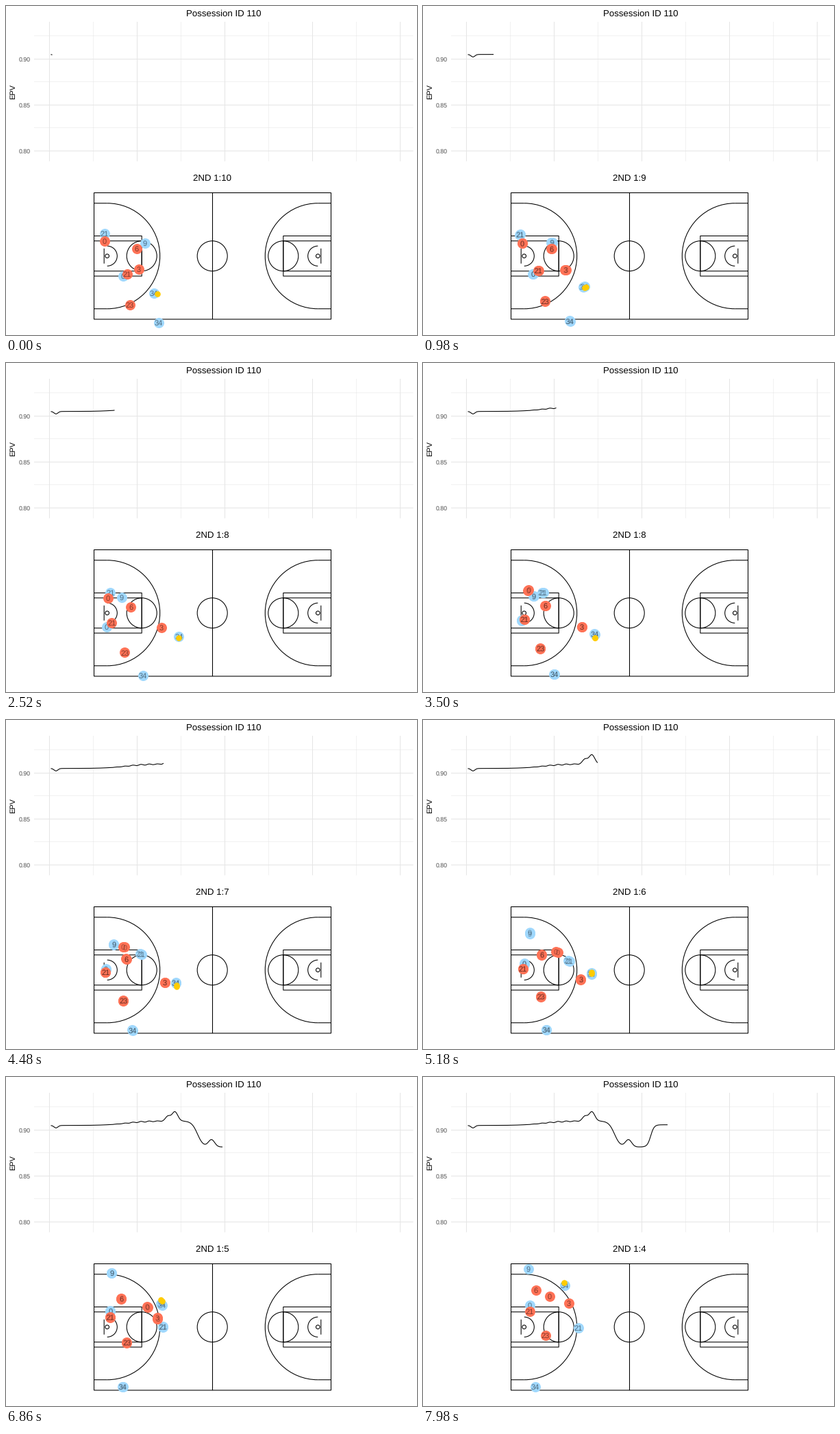
A matplotlib script that plays this animation: 600x480 px, repeating every 8000 ms.

```python
import matplotlib.pyplot as plt
import numpy as np
from matplotlib.animation import FuncAnimation
from matplotlib.collections import LineCollection
from matplotlib.patches import Arc, Circle, Rectangle

W, H = 600, 480
LOOP, TICK, STEP = 8000, 20, 140
LAST = LOOP // STEP
PX = 0.72  # points per pixel at 100 dpi

plt.rcParams.update({"font.family": "Liberation Sans", "path.snap": False,
                     "text.hinting": "none"})
fig = plt.figure(figsize=(W / 100, H / 100), dpi=100, facecolor="white")
ax = fig.add_axes([0, 0, 1, 1], xlim=(0, W), ylim=(H, 0))
ax.axis("off")


def label(x, y, text, size, **kw):
    kw = {"ha": "center", "va": "baseline", **kw}
    return ax.text(x, y, text, fontsize=size * PX, **kw)


def lines(segments, color="black", width=1.07, z=1):
    ax.add_collection(LineCollection(segments, colors=color,
                                     linewidths=width * PX, zorder=z))


# ---- chart ----
LEFT, RIGHT, TOP, BOTTOM = 41, 594.5, 23, 226.5


def grid(xs, ys, width):
    lines([[(x, TOP), (x, BOTTOM)] for x in xs]
          + [[(LEFT, y), (RIGHT, y)] for y in ys], "#E6E6E6", width, 0)


def bump(x, centre, width):
    return np.exp(-((x - centre) / width) ** 2)


def rise(x, centre, scale):
    return 1 / (1 + np.exp((centre - x) / scale))


def epv(x):
    """Height of the curve in pixels: level changes plus a few bumps."""
    level = (70.7 - 6.6 * rise(x, 175, 16) + 38 * rise(x, 279.5, 4.3)
             - 32.4 * rise(x, 332.4, 2.5))
    peak = 7 * bump(x, 236.5, 5) + 13.5 * bump(x, 246.5, 6)
    ripple = 0.7 * np.cos(2 * np.pi * (x - 191) / 12) * bump(x, 200, 32)
    return (level - peak + ripple + 3.6 * bump(x, 73, 4)
            - 10.5 * bump(x, 300, 6.5))


grid(np.arange(127.5, 520, 128), (43.5, 110.5, 177.5), 0.55)
grid(np.arange(63.5, 580, 128), (77.5, 144.5, 211.5), 1.07)
for i in range(3):
    label(35.7, 80.7 + 67 * i, f"{0.9 - 0.05 * i:.2f}", 8.8,
          ha="right", color="#4D4D4D")
label(10, 125, "EPV", 11, rotation=90, va="center")
label(317.3, 15.2, "Possession ID 110", 13.2)
clock = label(301.3, 255.3, "", 13.2)
epv_x = np.arange(66, 358, 0.5)
curve, = ax.plot([], [], color="black", lw=1.07 * PX)

# ---- court ----
MID, CY = 301.5, 364.75
HALF_W, HALF_H = 173, 92.25


def shape(patch):
    patch.set(fill=False, edgecolor="black", linewidth=1.07 * PX, zorder=1)
    ax.add_patch(patch)


def half_court(side):
    """side is -1 for the left basket, 1 for the right one."""
    def at(x):
        return MID + side * x
    base, hoop, line = at(HALF_W), at(153.8), at(103.3)
    for half in (29.3, 22):
        lines([[(base, CY - half), (line, CY - half),
                (line, CY + half), (base, CY + half)]])
    lines([[(base, CY + d), (hoop, CY + d)] for d in (-77, 77)])
    lines([[(at(158.3), CY - 11), (at(158.3), CY + 11)]])
    shape(Circle((line, CY), 22))
    shape(Circle((hoop, CY), 2.8))
    start = 90 if side > 0 else -90
    for r in (77, 14.6):
        shape(Arc((hoop, CY), 2 * r, 2 * r, theta1=start, theta2=start + 180))


shape(Rectangle((MID - HALF_W, CY - HALF_H), 2 * HALF_W, 2 * HALF_H))
lines([[(MID, CY - HALF_H), (MID, CY + HALF_H)]])
shape(Circle((MID - 0.3, CY), 22))
for side in (-1, 1):
    half_court(side)

# ---- players: a few waypoints each, evenly spaced in time ----
BLUE = [
    ("34", [(223, 462), (188, 453), (164, 452)]),
    ("34", [(216, 419), (250, 401), (249, 391), (240, 352), (207, 304)]),
    ("21", [(144, 332), (144, 335), (186, 337), (226, 361), (227, 366)]),
    ("9", [(203, 346), (174, 343), (159, 336), (155, 294), (154, 280)]),
    ("0", [(171, 394), (146, 384), (148, 354), (156, 333)]),
]
RED = [
    ("0", [(144, 343), (147, 347), (160, 329), (213, 343), (185, 320)]),
    ("6", [(191, 354), (177, 352), (165, 311)]),
    ("3", [(194, 384), (228, 386), (230, 377), (213, 330)]),
    ("21", [(177, 391), (146, 371), (156, 342)]),
    ("23", [(181, 436), (171, 413), (179, 377)]),
]
BALL = [("", [(221, 420), (250, 402), (250, 397), (240, 347), (206, 300)])]


def along(route, step):
    """Point on the smooth curve through the route's waypoints."""
    pts = np.array(route, float)
    slope = np.gradient(pts, axis=0)
    pos = np.clip(step / LAST, 0, 1) * (len(pts) - 1)
    i = min(int(pos), len(pts) - 2)
    u = pos - i
    ease = u * u * (3 - 2 * u)
    return (pts[i] + ease * (pts[i + 1] - pts[i])
            + u * (1 - u) ** 2 * slope[i] - u * u * (1 - u) * slope[i + 1])


class Team:
    def __init__(self, players, color, diameter, z):
        self.routes = [route for _, route in players]
        self.dots = ax.scatter([], [], s=(diameter * PX) ** 2, c=color,
                               linewidths=0, zorder=z)
        self.names = [[label(0, 0, name, 11, zorder=z + 0.5)
                       for name, _ in players if name] for _ in range(2)]

    def move(self, times):
        spots = [[along(route, t) for route in self.routes] for t in times]
        self.dots.set_offsets(np.concatenate(spots))
        for i, names in enumerate(self.names):
            for j, name in enumerate(names):
                name.set_visible(i < len(spots))
                if i < len(spots):
                    x, y = spots[i][j]
                    name.set(position=(x, y + 4), alpha=0.5 / len(spots) ** 0.5)


teams = [Team(BLUE, "#A0D8FD", 15, 3), Team(RED, "#FF7256", 15, 4),
         Team(BALL, "#FFCC00", 8.6, 5)]


def update(i):
    k = i * TICK // STEP
    x = epv_x[epv_x <= 67 + 5.08 * k]
    curve.set_data(x, epv(x))
    clock.set_text(f"2ND 1:{10 - (k + 4) // 10}")
    # most steps hold two tracking samples, every third only one
    times = (k - 0.3, k + 0.3) if k % 3 else (k,)
    for team in teams:
        team.move(times)
    return []


anim = FuncAnimation(fig, update, frames=LOOP // TICK, interval=TICK,
                     repeat=True, repeat_delay=0, blit=False)
plt.show()
```
